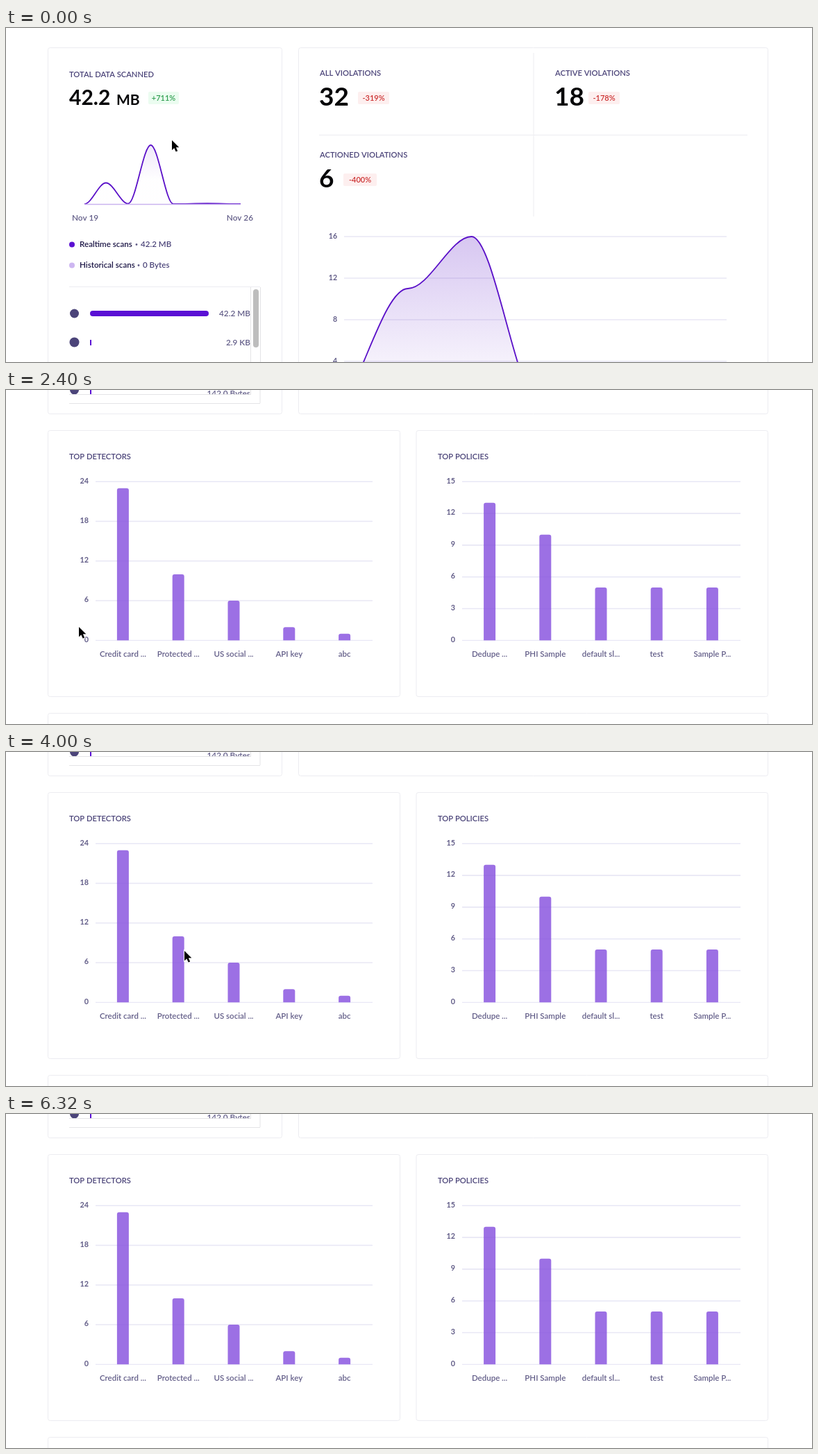
Animation of 1161x482 px, one loop 6.72 s. Source, as an HTML page with a canvas:

```html
<!DOCTYPE html>
<html lang="en">
<head>
<meta charset="utf-8">
<title>Dashboard</title>
<style>
html, body { margin: 0; width: 100%; height: 100%; overflow: hidden; background: #fff; }
canvas { display: block; }
</style>
</head>
<body>
<canvas id="stage" width="1161" height="482"></canvas>
<script>
const ctx = document.getElementById('stage').getContext('2d');
const LOOP = 6720, STEP = 80;
const INK = '#4b4479', MUTED = '#625d88', RULE = '#ececf1', GRID = '#e8e7f5', PURPLE = '#5a10c8';

function text(str, x, y, size, color = INK, align = 'left', weight = 600) {
  ctx.font = `${weight} ${size}px Lato, sans-serif`;
  ctx.fillStyle = color;
  ctx.textAlign = align;
  ctx.fillText(str, x, y);
}

function box(x, y, w, h, r, fill, stroke) {
  ctx.beginPath();
  ctx.roundRect(x, y, w, h, r);
  if (fill) { ctx.fillStyle = fill; ctx.fill(); }
  if (stroke) { ctx.strokeStyle = stroke; ctx.lineWidth = 1; ctx.stroke(); }
}

function line(x1, y1, x2, y2, color = RULE, width = 1) {
  ctx.beginPath();
  ctx.moveTo(x1, y1);
  ctx.lineTo(x2, y2);
  ctx.strokeStyle = color;
  ctx.lineWidth = width;
  ctx.stroke();
}

function dot(x, y, r, color) {
  ctx.beginPath();
  ctx.arc(x, y, r, 0, 7);
  ctx.fillStyle = color;
  ctx.fill();
}

const card = (x1, y1, x2, y2) => box(x1 + .5, y1 + .5, x2 - x1 - 1, y2 - y1 - 1, 3, '#fff', RULE);

function badge(str, x, y, w, up) {
  box(x, y, w, 18, 2, up ? '#ebfcf0' : '#fdefef');
  text(str, x + w / 2, y + 13, 11, up ? '#2f9e50' : '#cc3030', 'center');
}

function gradient(y1, y2, a1, a2) {
  const g = ctx.createLinearGradient(0, y1, 0, y2);
  g.addColorStop(0, `rgba(96,30,200,${a1})`);
  g.addColorStop(1, `rgba(96,30,200,${a2})`);
  return g;
}

// Fills a curve down to its base, then strokes it.
function area(path, fill, x1, x2, base) {
  ctx.fillStyle = fill;
  ctx.fill(new Path2D(`${path} L${x2} ${base} L${x1} ${base}Z`));
  ctx.strokeStyle = PURPLE;
  ctx.lineWidth = 1.8;
  ctx.stroke(new Path2D(path));
}

// Joins points with curves that are level at every point.
function wave(points) {
  return points.map(([x, y], i) => {
    if (!i) return `M${x} ${y}`;
    const [px, py] = points[i - 1], d = (x - px) / 3;
    return `C${px + d} ${py} ${x - d} ${y} ${x} ${y}`;
  }).join('');
}

function metric(title, value, x, y) {
  text(title, x, y, 11.2);
  text(value, x - 1, y + 43, 37, '#060608', 'left', 700);
}

function legend(name, value, y, color, bulletX) {
  dot(95, y - 3.5, 4, color);
  text(name, 106, y, 11.6, '#1b1545');
  dot(bulletX, y - 3.5, 1.4, MUTED);
  text(value, bulletX + 6, y, 11.6);
}

function overview() {
  card(60, 28, 398, 500);
  text('TOTAL DATA SCANNED', 91, 71, 11.2);
  text('42.2', 91, 111, 30, '#060608', 'left', 700);
  text('MB', 159, 111, 21, '#060608', 'left', 700);
  badge('+711%', 205, 92, 44, true);

  area(wave([[113, 254], [144, 223.5], [176, 253.5], [208.5, 169], [241, 254], [290, 253.2], [338, 254]]),
    gradient(169, 218, .1, .005), 113, 338, 254);
  line(113, 254.5, 338, 254.5, '#c9b3ef', 1.6);
  text('Nov 19', 95, 278, 11.8, MUTED);
  text('Nov 26', 356, 278, 11.8, MUTED, 'right');
  legend('Realtime scans', '42.2 MB', 316, '#5b10d2', 188);
  legend('Historical scans', '0 Bytes', 346, '#cdb6f1', 191);

  line(91, 373.5, 366, 373.5);
  line(352.5, 374, 352.5, 482, '#e4e4e6');
  line(366.5, 374, 366.5, 482, '#e4e4e6');
  box(356, 377, 8, 84, 4, '#bdbdbd');
  dot(98.5, 412, 6.5, INK);
  box(121, 408, 171, 8, 4, '#5a10d4');
  text('42.2 MB', 352, 416, 11.8, MUTED, 'right');
  dot(98.5, 453.5, 7, INK);
  box(121, 450, 2, 8, 0, '#5a10d4');
  text('2.9 KB', 352, 458, 11.8, MUTED, 'right');

  card(421, 28, 1098, 500);
  line(760, 36, 760, 272);
  line(451, 154.5, 1068, 154.5);
  metric('ALL VIOLATIONS', '32', 452, 69);
  badge('-319%', 507, 92, 45);
  metric('ACTIVE VIOLATIONS', '18', 791, 69);
  badge('-178%', 839, 92, 45);
  metric('ACTIONED VIOLATIONS', '6', 452, 187);
  badge('-400%', 486, 210, 48);
  for (let i = 0; i < 4; i++) {
    const y = 301 + i * 60;
    line(487, y, 1038, y, GRID, 1.5);
    text(16 - i * 4, 477, y + 2.5, 10.5, MUTED, 'right', 700);
  }
  area('M487 541C518 490 548 376 579 376S640 301 670.5 301S731 506 762 541',
    gradient(301, 520, .25, .02), 487, 762, 541);
}

const detectors = {
  left: 129, right: 528, step: 6, values: [23, 10, 6, 2, 1],
  labels: ['Credit card ...', 'Protected ...', 'US social ...', 'API key', 'abc'],
  tips: ['Credit card number', 'Protected health information', 'US social security number', 'API key']
};
const policies = {
  left: 657, right: 1058, step: 3, values: [13, 10, 5, 5, 5],
  labels: ['Dedupe ...', 'PHI Sample', 'default sl...', 'test', 'Sample P...']
};

function barChart({ left, right, step, values, labels, tips }, hover) {
  const lines = step === 6 ? 4 : 5, top = 132.3, base = 361.3;
  const unit = (base - top) / lines / step;
  const centre = i => left - .5 + (right - left) * (i + .5) / 5;
  for (let i = 0; i <= lines; i++) {
    const y = base - i * step * unit;
    line(left, y, right, y, GRID, i ? 1.6 : 1.2);
    text(i * step, left - 10, y + 2.2, 10.8, MUTED, 'right', 700);
  }
  values.forEach((v, i) => {
    box(centre(i) - 8.5, base - v * unit, 17, v * unit, [3, 3, 0, 0],
      i === hover ? '#c39cfb' : 'rgba(139,87,224,.85)');
    text(labels[i], centre(i), 385, 11.5, MUTED, 'center');
  });
  if (hover >= 0) {
    const tip = `${values[hover]} ${tips[hover]}`;
    const x = centre(hover) - .5, y = base - values[hover] * unit;
    ctx.font = '700 11.8px Lato, sans-serif';
    box(x, y - 12, ctx.measureText(tip).width + 17, 24.5, 4, '#1a184f');
    text(tip, x + 8.5, y + 4.2, 11.8, '#fff', 'left', 700);
  }
}

function details(hover) {
  card(60, -20, 398, 35);
  card(421, -20, 1098, 35);
  ctx.save();
  ctx.beginPath();
  ctx.rect(90, 0, 263, 6);
  ctx.clip();
  dot(98.5, 0, 6.5, INK);
  text('142.0 Bytes', 352, 8.5, 11.8, MUTED, 'right');
  box(121, 0, 2, 6, 0, '#5a10d4');
  ctx.restore();
  line(91, 6.5, 353, 6.5, '#e4e4e6');
  line(352.5, 0, 352.5, 6, '#e4e4e6');
  line(366, 0, 366, 19, '#e4e4e6');
  line(91, 19.5, 366, 19.5, '#e4e4e6');

  card(60, 58, 568, 443);
  card(590.5, 58, 1098, 443);
  card(60, 466, 1098, 520);
  text('TOP DETECTORS', 91, 100, 11.2);
  text('TOP POLICIES', 622, 100, 11.2);
  barChart(policies, -1);
  barChart(detectors, hover);
}

// Pointer stops: time, x, y.
const stops = [
  [0, 239, 162], [320, 239, 162], [560, 92, 97], [880, 180, 97], [1120, 180, 97],
  [1360, 219, 170], [1840, 110, 383], [2160, 437, 386], [2320, 72, 400], [2400, 105, 342],
  [2560, 96, 188], [2960, 164.5, 191], [3680, 164.5, 191], [4000, 257, 287], [4160, 247, 293],
  [4560, 247, 293], [4800, 317, 321], [4960, 326, 328], [5200, 326, 328], [5600, 406, 346],
  [6080, 406, 346], [6240, 412, 475], [6320, 414, 520], [LOOP, 414, 520]
];
// Start and end of the hover over each bar.
const hovers = [[2800, 3760], [4080, 4640], [4880, 5360], [5440, 6160]];
const arrow = new Path2D('M0 0V14.2L3.3 11.2L5.7 16.6L8.2 15.5L5.9 10.3H10.3Z');
const beam = new Path2D('M-3.5-7.5Q0-7.5 0-5.5Q0-7.5 3.5-7.5M0-6V6M-3.5 7.5Q0 7.5 0 5.5Q0 7.5 3.5 7.5M-1.5 1H1.5');

function pointer(t) {
  const i = stops.findIndex(s => s[0] > t);
  const [t0, x0, y0] = stops[i - 1], [t1, x1, y1] = stops[i];
  const u = (t - t0) / (t1 - t0), k = u * u * (3 - 2 * u);
  const shape = t >= 560 && t < 1200 ? beam : arrow;
  ctx.save();
  ctx.translate(x0 + (x1 - x0) * k, y0 + (y1 - y0) * k);
  ctx.strokeStyle = '#fff';
  ctx.lineWidth = shape === beam ? 3 : 2;
  ctx.stroke(shape);
  ctx.strokeStyle = ctx.fillStyle = '#000';
  ctx.lineWidth = 1.4;
  if (shape === beam) ctx.stroke(shape);
  else ctx.fill(shape);
  ctx.restore();
}

function draw(now) {
  const t = Math.floor(now % LOOP / STEP) * STEP;
  ctx.fillStyle = '#fff';
  ctx.fillRect(0, 0, 1161, 482);
  if (t < STEP) overview();
  else details(hovers.findIndex(([from, to]) => t >= from && t < to));
  pointer(t);
}

const start = performance.now();
function tick() {
  draw(performance.now() - start);
  requestAnimationFrame(tick);
}
tick();
</script>
</body>
</html>
```
